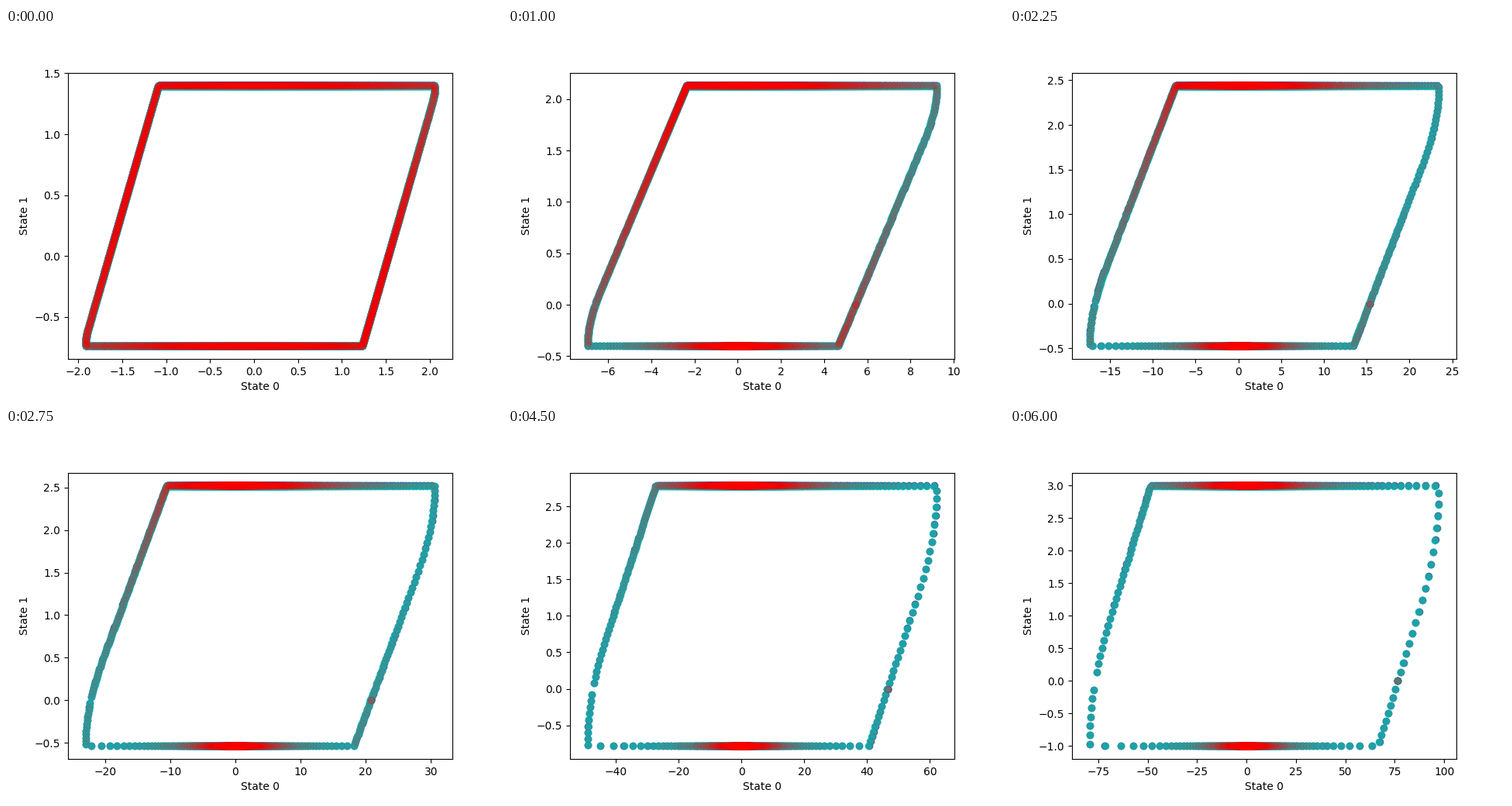
Animation of 640x480 px, one loop 6250 ms. Source, as a matplotlib script:

```python
import numpy as np
import matplotlib.pyplot as plt
from matplotlib.animation import FuncAnimation

FRAMES = 25
INTERVAL = 250
DT = 0.4

# Rays every 0.1 degree; the zero ray repeats and the half turn is left out.
STEPS = np.arange(3600)
ANGLES = np.radians(np.r_[np.zeros(3), STEPS[STEPS != 1800] / 10])


def drift(s):
    """Total disturbance on state 1 up to time s."""
    return 0.09 * s + 0.1 * (1 - np.exp(-s))


def drift_moment(s):
    """Integral of drift, its effect on state 0."""
    return 0.045 * s**2 + 0.1 * (s - 1 + np.exp(-s))


def reach_polygon(t):
    """Boundary of the reachable set at time t, counterclockwise."""
    center = np.array([t - 1 + np.exp(-t), 1 - np.exp(-t)])
    half_width = 1 + 1.2 * t + 0.6 * t**2
    half_side = np.array([t + drift_moment(t), 1 + drift(t)])

    # Initial spread gives a straight side, the disturbance bends its end.
    s = np.linspace(0, t, 80)
    moved = (t - s) * drift(s) + drift_moment(s)
    bend = np.column_stack([t + moved, 1 + drift(s)])
    side = np.vstack([[0, 0], bend]) * 2 - half_side
    side[:, 0] += half_width
    return center + np.vstack([side, -side])


def cast_rays(poly, angles):
    """Points where rays from the origin meet the polygon."""
    theta = np.unwrap(np.arctan2(poly[:, 1], poly[:, 0]))
    wrapped = theta[0] + (angles - theta[0]) % (2 * np.pi)
    i = np.searchsorted(theta, wrapped, side="right") - 1
    i = np.clip(i, 0, len(poly) - 1)
    a = poly[i]
    edge = poly[(i + 1) % len(poly)] - a
    d = np.column_stack([np.cos(angles), np.sin(angles)])
    cross = lambda p, q: p[:, 0] * q[:, 1] - p[:, 1] * q[:, 0]
    radius = cross(a, edge) / cross(d, edge)
    return d * radius[:, None]


fig, ax = plt.subplots(figsize=(6.4, 4.8), dpi=100)


def draw(frame):
    ax.clear()
    x, y = cast_rays(reach_polygon(DT * (frame + 1)), ANGLES).T
    ax.scatter(x, y, color="C0")
    ax.scatter(0.999 * x, 0.999 * y, color="c", alpha=0.85)
    ax.scatter(x, y, color="r", alpha=0.1)
    ax.set_xlabel("State 0")
    ax.set_ylabel("State 1")
    return ax.collections


anim = FuncAnimation(fig, draw, frames=FRAMES, init_func=lambda: [],
                     interval=INTERVAL, repeat=True)
plt.show()
```
